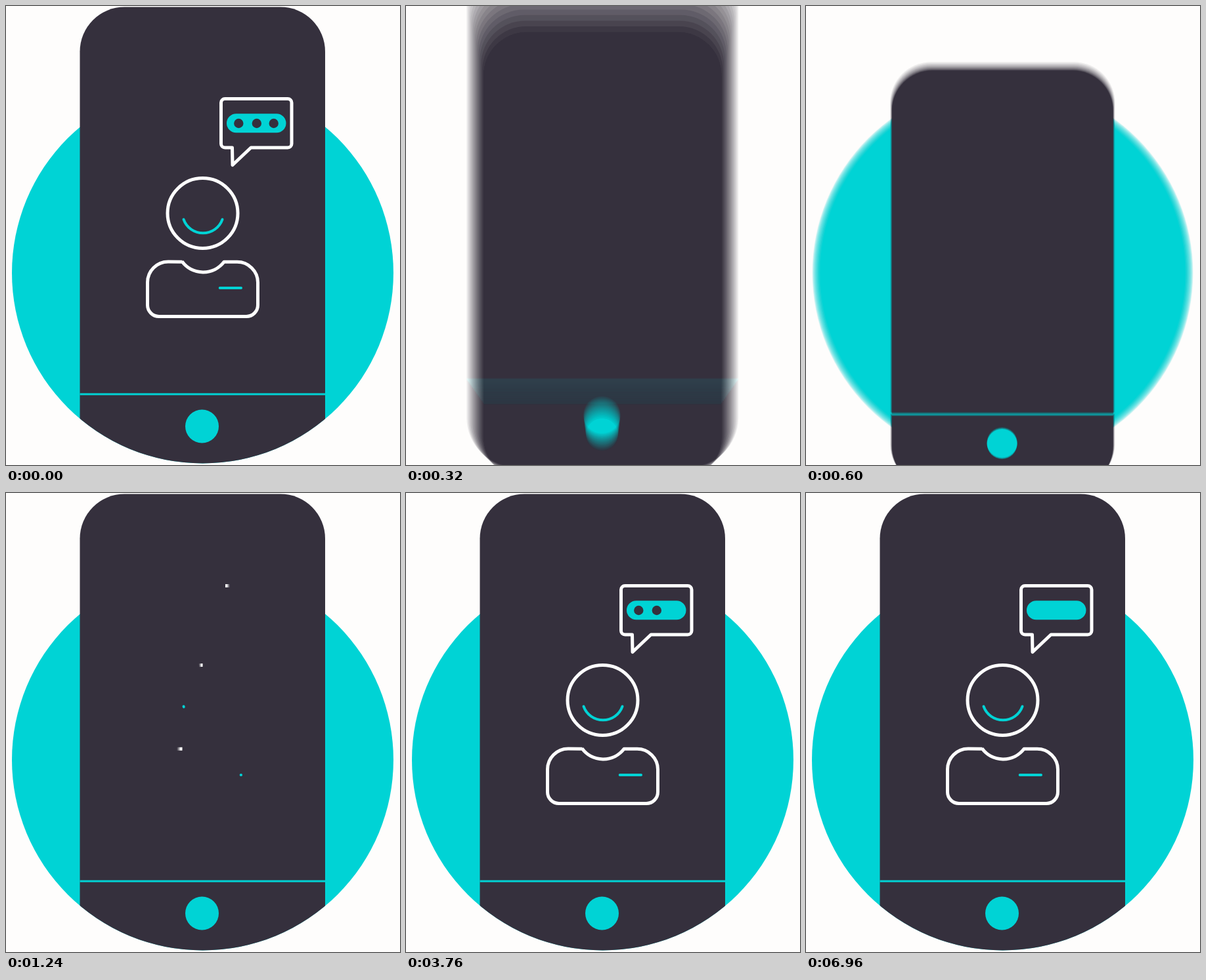
Recreate the animation shown at these times as an HTML page with a canvas. Size 600 by 700 pixels, loop 7000 ms.

```html
<!DOCTYPE html>
<html lang="en">
<head>
<meta charset="utf-8">
<title>Phone chat</title>
<style>
  html, body { margin: 0; overflow: hidden; }
  canvas { display: block; }
</style>
</head>
<body>
<canvas id="stage" width="600" height="700"></canvas>
<script>
const LOOP = 7000, STEP = 40, SHUTTER = 20, SAMPLES = 16;
const PAPER = '#fefdfc', DARK = '#35303d', CYAN = '#00d3d5', WHITE = '#fff';
const CX = 299.5, CY = 407, RADIUS = 290.5;

const screen = document.getElementById('stage').getContext('2d');
const buffer = document.createElement('canvas');
buffer.width = 600;
buffer.height = 700;
const g = buffer.getContext('2d');

const progress = (t, from, to) => Math.min(1, Math.max(0, (t - from) / (to - from)));
const ease = (t, from, to) => {
  const u = progress(t, from, to);
  return u * u * (3 - 2 * u);
};

function outline(d, color, width, cap) {
  const path = document.createElementNS('http://www.w3.org/2000/svg', 'path');
  path.setAttribute('d', d);
  return { shape: new Path2D(d), length: path.getTotalLength(), color, width, cap };
}

const outlines = [
  // speech bubble
  outline('M334 141.5H429A6 6 0 0 1 435 147.5V210A6 6 0 0 1 429 216H373L345 242.5L344.5 216H333.5' +
    'A6 6 0 0 1 327.5 210V147.5A6 6 0 0 1 333.5 141.5H334', WHITE, 5, 'butt'),
  // head
  outline('M299.5 262.5A53.5 53.5 0 0 0 299.5 369.5A53.5 53.5 0 0 0 299.5 262.5', WHITE, 5, 'butt'),
  // shoulders
  outline('M268.5 390.3L247 390A31.5 31.5 0 0 0 215.5 421.5V456A17.5 17.5 0 0 0 233 473.5H366' +
    'A17.5 17.5 0 0 0 383.5 456V421.5A31.5 31.5 0 0 0 352 390.3H332A40 40 0 0 1 268 389.5', WHITE, 5, 'butt'),
  // smile and badge
  outline('M270.5 325.5A31.3 31.3 0 0 0 329.5 325.5', CYAN, 4, 'round'),
  outline('M358 430H325.7', CYAN, 4, 'round')
];

const pill = outline('M350.5 178.8H412', CYAN, 29, 'round');
const dots = [354.3, 381.8, 407.7];
const typing = [[2640, 3400], [3560, 4320], [4480, 6960]];

function disc(x, y, r, color) {
  g.fillStyle = color;
  g.beginPath();
  g.arc(x, y, r, 0, 2 * Math.PI);
  g.fill();
}

function trim({ shape, length, color, width, cap }, part) {
  if (part <= 0) return;
  g.strokeStyle = color;
  g.lineWidth = width;
  g.lineCap = cap;
  g.lineJoin = 'round';
  g.setLineDash(part < 1 ? [length * part, length * 2] : []);
  g.stroke(shape);
}

// Pops up, overshoots, dips below full size, then settles.
function phoneScale(t) {
  if (t < 386) return 1.28 * Math.sin(progress(t, 218, 386) * Math.PI / 2);
  if (t < 620) return 1.28 - 0.381 * ease(t, 386, 620);
  return 0.899 + 0.101 * ease(t, 620, 840);
}

function drawPhone(t) {
  const s = phoneScale(t);
  if (s <= 0) return;
  const loose = 1 - ease(t, 620, 840);
  g.save();
  if (loose < 1) {
    g.beginPath();
    g.rect(0, 0, 600, CY);
    g.arc(CX, CY, RADIUS + 60 * loose, 0, Math.PI);
    g.clip();
  }
  // local origin: middle of the line above the home button
  g.translate(CX, 592 + 6 * loose + 265 * (1 - s));
  g.scale(s, s);
  g.fillStyle = DARK;
  g.beginPath();
  g.roundRect(-187, -590.5 + 7 * loose, 373.5, 704, 68);
  g.fill();
  g.fillStyle = CYAN;
  g.fillRect(-187, -1.5, 373.5, 3);
  disc(-1, 49, 25.5, CYAN);
  g.restore();
}

function drawScene(t) {
  g.fillStyle = PAPER;
  g.fillRect(0, 0, 600, 700);
  disc(CX, CY, RADIUS * ease(t, 424, 614), CYAN);
  drawPhone(t);
  const drawn = ease(t, 1200, 1840);
  outlines.forEach(o => trim(o, drawn));
  trim(pill, ease(t, 1500, 1840));
  for (const [on, off] of typing) {
    dots.forEach((x, i) => {
      if (t >= on + 200 * i && t < off) disc(x, 179, 7.2, DARK);
    });
  }
}

function render(now) {
  let t = Math.floor(now % LOOP / STEP) * STEP;
  if (t < 200) t = 6900; // opens on the finished picture
  const moving = t <= 840 || (t >= 1240 && t <= 1840);
  const count = moving ? SAMPLES : 1;
  // running average over the shutter gives the motion blur
  for (let k = 0; k < count; k++) {
    drawScene(moving ? t + SHUTTER * (k / (count - 1) - 0.5) : t);
    screen.globalAlpha = 1 / (k + 1);
    screen.drawImage(buffer, 0, 0);
  }
}

const start = performance.now();
function tick() {
  render(performance.now() - start);
  requestAnimationFrame(tick);
}
tick();
</script>
</body>
</html>
```
